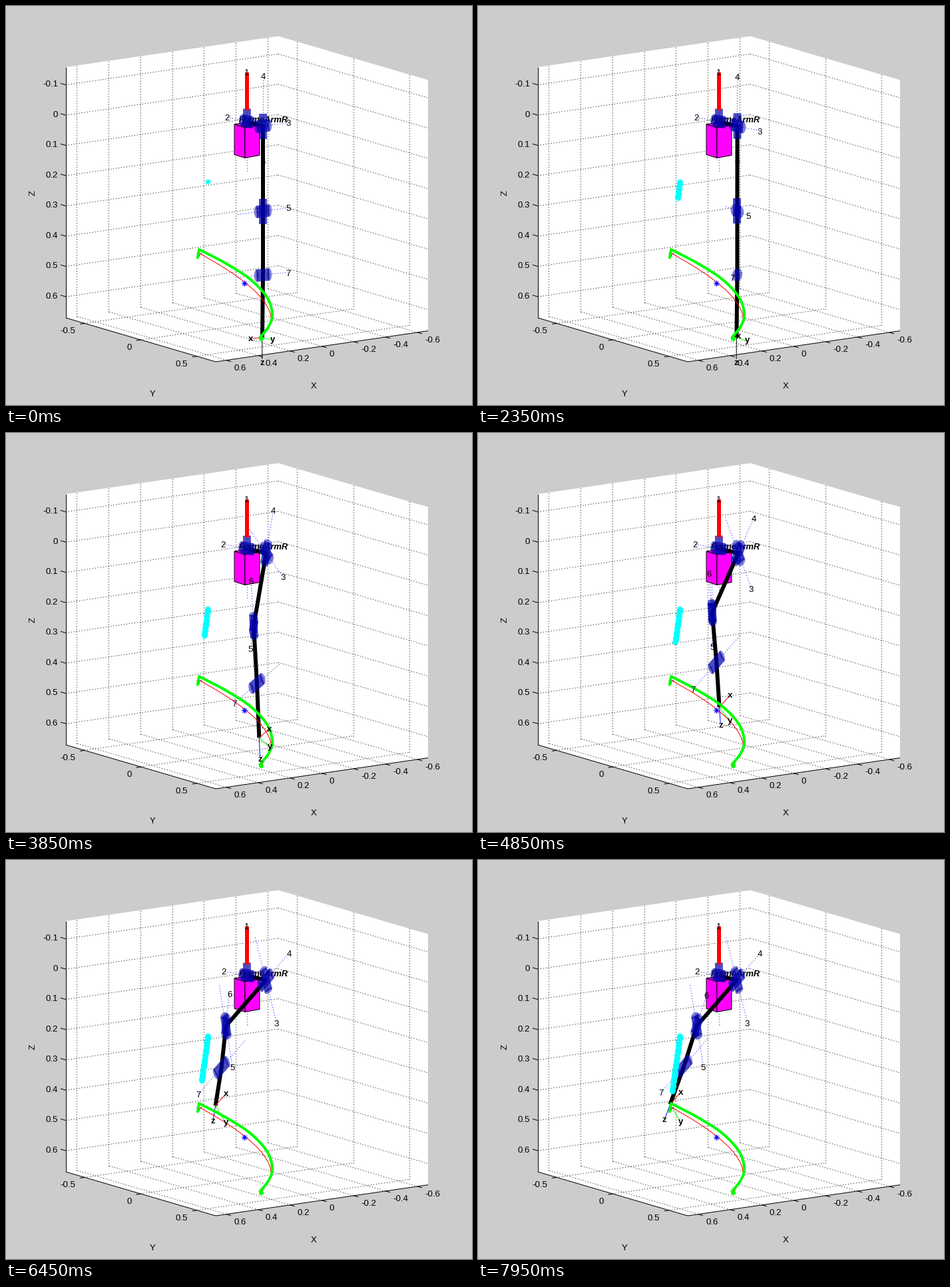
These frames come from a looping animation (700 px wide and 600 px high, 8 s). A matplotlib script:

```python
import numpy as np
import matplotlib.pyplot as plt
from matplotlib.animation import FuncAnimation
from matplotlib.collections import LineCollection
from matplotlib.patches import Polygon

WIDTH, HEIGHT, DPI = 700, 600, 100
INTERVAL, FRAMES = 50, 160
PX = 72 / DPI                       # points per pixel
M, Z_TOP, Z_BOTTOM = 0.667, -0.159, 0.67
SQUEEZE = 0.64                      # horizontal scale relative to vertical
UPPER_ARM, FOREARM = 128, 96
AXIS_LENGTH, HALF_LENGTH, RADIUS = 75, 19, 9.3
BLUE = (0, 0, 0.67)
FONT = dict(family="Liberation Sans", size=13.3 * PX)
DOTS = (0, (1, 3))
TOOL_COLORS = {"x": "red", "y": "lime", "z": "blue"}
BASELINE = {"x": 3.5, "y": 2, "z": 3.5}

fig = plt.figure(figsize=(WIDTH / DPI, HEIGHT / DPI), dpi=DPI, facecolor="#cccccc")
ax = fig.add_axes([0, 0, 1, 1])
ax.set(xlim=(0, WIDTH), ylim=(HEIGHT, 0))
ax.axis("off")


def sweep(k, begin, finish, start, end, via=None):
    """Eased move from start to end between two steps, bent towards via."""
    start, end = np.array(start), np.array(end)
    via = (start + end) / 2 if via is None else np.array(via)
    t = np.clip((k - begin) / (finish - begin), 0, 1)
    e = t * t * (3 - 2 * t)
    return (1 - e) ** 2 * start + 2 * e * (1 - e) * via + e * e * end


def pose(k):
    """Arm points, (center, axis) of each joint, and tool axis offsets."""
    sway = np.sin(2.6 * k / 80)
    base = np.array([362, 173.5])
    shoulder = np.array([386 + 5 * sway, 180.5])
    upper = sweep(k, 23, 66, (0, UPPER_ARM), (-60, 69))
    fore = sweep(k, 25, 80, (0, FOREARM), (-19, 60), via=(20, 65))
    hand = sweep(k, 25, 80, (-1, 94), (-21, 58), via=(17, 51))
    elbow = shoulder + upper
    wrist = elbow + fore
    tip = wrist + hand

    wrist_axis = sweep(k, 6, 49, (38, -4), (-35, 40), via=(-36, -2))
    joints = [
        (base, np.array([-0.5, -AXIS_LENGTH])),
        (base, np.array([-30 - 6 * sway, -6])),
        (shoulder, sweep(k, 10, 62, (38, -5), (16, 64))),
        (shoulder, -upper * AXIS_LENGTH / UPPER_ARM),
        (elbow, sweep(k, 10, 62, (38, -5), (10, 61), via=(-30, 28))),
        (elbow, -fore * AXIS_LENGTH / FOREARM),
        (wrist, wrist_axis),
    ]
    tool = {"x": -0.45 * wrist_axis,
            "y": sweep(k, 16, 65, (16, 4), (16, 27)),
            "z": 0.4 * hand}
    return [(365, 175), shoulder, elbow, wrist, tip], joints, tool


def smooth(points, samples=120):
    """Cubic curve through evenly timed points."""
    points = np.array(points, float)
    slopes = np.gradient(points, axis=0)
    t = np.linspace(0, len(points) - 1, samples)
    i = np.minimum(t.astype(int), len(points) - 2)
    u = (t - i)[:, None]
    return ((1 + 2 * u) * (1 - u) ** 2 * points[i] + u * (1 - u) ** 2 * slopes[i]
            + u * u * (3 - 2 * u) * points[i + 1] + u * u * (u - 1) * slopes[i + 1])


def project(x, y, z):
    fx, fy = (M - x) / (2 * M), (y + M) / (2 * M)
    return np.array([90 + 319 * fx + 225 * fy,
                     469 - 46.5 * fx + 66 * fy + (z - Z_BOTTOM) * 455])


def line(points, color, width, zorder, **style):
    xs, ys = np.transpose(points)
    return ax.plot(xs, ys, color=color, lw=width * PX, zorder=zorder, **style)[0]


def polygon(points, zorder, **style):
    return ax.add_patch(Polygon(points, closed=True, zorder=zorder, **style))


def write(x, y, text, ha="center", **style):
    return ax.text(x, y, text, ha=ha, va="baseline", zorder=20, **{**FONT, **style})


def draw_axes():
    rim = [project(*p) for p in [
        (M, -M, Z_TOP), (-M, -M, Z_TOP), (-M, M, Z_TOP),
        (-M, M, Z_BOTTOM), (M, M, Z_BOTTOM), (M, -M, Z_BOTTOM)]]
    polygon(rim, 0, fc="white", ec="none")

    grid, solid = [], [rim[i:i + 2] for i in (3, 4)] + [[rim[5], rim[0]]]

    def tick(edge, corner, far, outward):
        grid.extend([[edge, corner], [corner, far]])
        solid.append([edge, edge + outward])

    for x in np.arange(6, -7, -2) / 10:
        edge = project(x, M, Z_BOTTOM)
        tick(edge, project(x, -M, Z_BOTTOM), project(x, -M, Z_TOP), (7, 2))
        write(edge[0] + 11, edge[1] + 15, f"{x:g}", ha="left")
    for y in (-0.5, 0, 0.5):
        edge = project(M, y, Z_BOTTOM)
        tick(edge, project(-M, y, Z_BOTTOM), project(-M, y, Z_TOP), (-7, 1))
        write(edge[0] - 14, edge[1] + 15, f"{y:g}", ha="right")
    for z in np.arange(-1, 7) / 10:
        edge = project(M, -M, z)
        tick(edge, project(-M, -M, z), project(-M, M, z), (-8, -2.3))
        write(edge[0] - 12, edge[1] + 2.8, f"{z:g}", ha="right")
    for lines, style in [(grid, DOTS), (solid, "solid")]:
        ax.add_collection(LineCollection(lines, colors="black", lw=PX,
                                         linestyles=[style], zorder=1))
    write(462, 575, "X")
    write(220, 587, "Y")
    ax.text(41, 281, "Z", rotation=90, ha="center", va="center", **FONT)


def draw_scene():
    box = dict(fc="magenta", ec="black", lw=PX)
    left, front, right, back = (343, 178), (359, 183), (381, 179), (365, 174)
    polygon([left, front, right, back], 3, **box)
    for a, b in [(left, front), (front, right)]:
        polygon([a, b, (b[0], b[1] + 45.5), (a[0], a[1] + 45.5)], 5, **box)
    line([(362, 100), (362, 157)], "red", 6, 5, solid_capstyle="butt")
    write(350, 175, "FrameArmR", ha="left", weight="bold", style="italic",
          size=13 * PX).set_zorder(6)

    planned = [(289, 371), (325, 392), (358, 415), (385, 441),
               (398, 470), (384, 500)]
    done = [(290, 366), (330, 387), (367, 411), (392, 438), (400, 463),
            (395, 481), (382, 498)]
    line(smooth(planned), "red", 1, 12)
    line([(288, 378), *smooth(done)], "lime", 4, 12)
    ax.plot(382.5, 499.5, "o", color="lime", ms=7 * PX, mew=0, zorder=12)
    ax.plot(289.5, 371.5, "+", color="black", ms=8 * PX, mew=PX, zorder=11)
    ax.plot(357.5, 416.5, marker=(8, 2, 0), color="blue", ms=8 * PX, mew=PX, zorder=13)


def cylinder_shapes(center, offset):
    """Side and two end caps of a joint turning about the given axis."""
    squeeze = np.array([SQUEEZE, 1])
    axis = offset / squeeze
    length = np.hypot(*axis)
    u = axis / length
    lean = min(length / AXIS_LENGTH, 1)
    half = u * HALF_LENGTH * lean
    side = np.array([-u[1], u[0]]) * RADIUS
    body = np.array([half + side, half - side, -half - side, -half + side])
    a = np.linspace(0, 2 * np.pi, 12, endpoint=False)[:, None]
    cap = np.cos(a) * side + np.sin(a) * u * RADIUS * np.sqrt(1 - lean ** 2)
    return [center + shape * squeeze for shape in (body, cap + half, cap - half)]


class Joint:
    def __init__(self, number):
        zorder = 4 if number == 1 else 9
        self.axis = line([(0, 0)], "blue", 1, 2, linestyle=DOTS)
        self.parts = [polygon([(0, 0)] * 3, zorder, fc=BLUE, ec="none", alpha=alpha)
                      for alpha in (0.7, 0.5, 0.5)]
        self.text = write(0, 0, str(number))

    def place(self, center, offset):
        self.axis.set_data(*np.transpose([center - offset, center + offset]))
        for part, shape in zip(self.parts, cylinder_shapes(center, offset)):
            part.set_xy(shape)
        self.text.set_position(center + offset + (0, 5))


draw_axes()
draw_scene()
joints = [Joint(number) for number in range(1, 8)]
arm = line([(0, 0)], "black", 6, 8, solid_capstyle="butt", solid_joinstyle="round")
trail = ax.plot([], [], ls="none", marker=(8, 2, 0), color="cyan",
                ms=8 * PX, mew=1.2 * PX, zorder=14)[0]
tool_lines = {c: line([(0, 0)], TOOL_COLORS[c], 1, 11) for c in TOOL_COLORS}
tool_texts = {c: write(0, 0, c, weight="bold") for c in TOOL_COLORS}


def update(frame):
    k = (frame + 1) // 2
    points, placements, tool = pose(k)
    arm.set_data(*np.transpose(points))
    for joint, placement in zip(joints, placements):
        joint.place(*placement)
    steps = np.arange(k + 1)
    trail.set_data(303.3 - 0.145 * steps, 264 + 1.05 * steps)
    tip = points[-1]
    for c, offset in tool.items():
        tool_lines[c].set_data(*np.transpose([tip, tip + 0.85 * offset]))
        tool_texts[c].set_position(tip + offset + (0, BASELINE[c]))
    tool_lines["z"].set_color("black" if k < 28 else "blue")
    return []


anim = FuncAnimation(fig, update, frames=FRAMES, interval=INTERVAL,
                     repeat=True, repeat_delay=0, blit=False)
plt.show()
```
